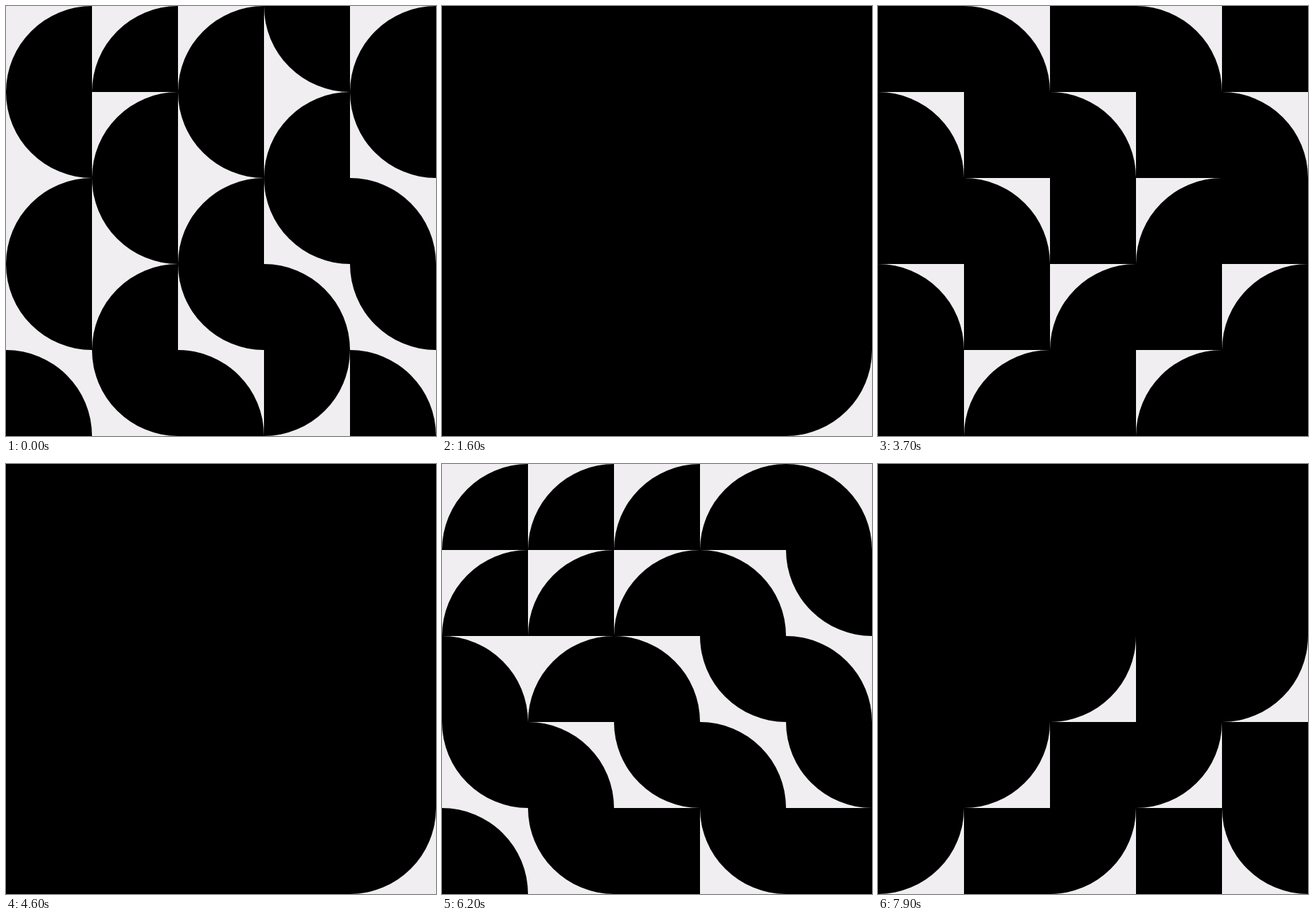
An HTML page that plays this animation: 600 px wide and 600 px high, repeating every 8 s.

```html
<!DOCTYPE html>
<html lang="en">
<head>
<meta charset="utf-8">
<title>Quarter-disc tiles</title>
<style>
  html, body { margin: 0; width: 100%; height: 100%; overflow: hidden; background: #f0eef1; }
  #stage { position: relative; width: 600px; height: 600px; overflow: hidden; }
  #stage div { position: absolute; width: 120px; height: 120px; background: #000; }
</style>
</head>
<body>
<div id="stage"></div>
<script>
const N = 5, SIZE = 120;
const LOOP = 8000, TICK = 100;
const CYCLE = 3000, OFFSET = 1600;
const STAGGER = 47.5;

// When each pose begins for the first tile of the wave.
const STARTS = [0, 297, 757, 1167, 1506];
// Square, then the rounded corner travels clockwise, then square again.
const POSES = [
  '0px 0px 0px 0px',
  '0px 0px 120px 0px',
  '0px 0px 0px 120px',
  '120px 0px 0px 0px',
  '0px 120px 0px 0px',
  '0px 0px 0px 0px'
];

const cells = [];
for (let row = 0; row < N; row++)
  for (let col = 0; col < N; col++)
    cells.push({ row, col, diag: row + col });
cells.sort((a, b) => a.diag - b.diag || a.row - b.row);

// Even diagonals sweep up from the bottom right, odd ones sweep back down.
const order = [
  ...cells.filter(c => c.diag % 2 === 0).reverse(),
  ...cells.filter(c => c.diag % 2 === 1)
];

function poseAt(time, rank) {
  const phase = (time - OFFSET + CYCLE) % CYCLE - rank * STAGGER;
  return POSES[STARTS.filter(s => s <= phase).length];
}

function keyframes(rank) {
  const frames = [];
  let last;
  for (let t = 0; t < LOOP; t += TICK) {
    const borderRadius = poseAt(t, rank);
    if (borderRadius !== last)
      frames.push({ offset: t / LOOP, borderRadius, easing: 'steps(1, end)' });
    last = borderRadius;
  }
  frames.push({ offset: 1, borderRadius: last });
  return frames;
}

const stage = document.getElementById('stage');
const players = order.map(({ row, col }, rank) => {
  const tile = document.createElement('div');
  tile.style.left = col * SIZE + 'px';
  tile.style.top = row * SIZE + 'px';
  stage.append(tile);
  return tile.animate(keyframes(rank), { duration: LOOP, iterations: Infinity });
});
players.forEach(p => { p.startTime = document.timeline.currentTime; });
</script>
</body>
</html>
```
